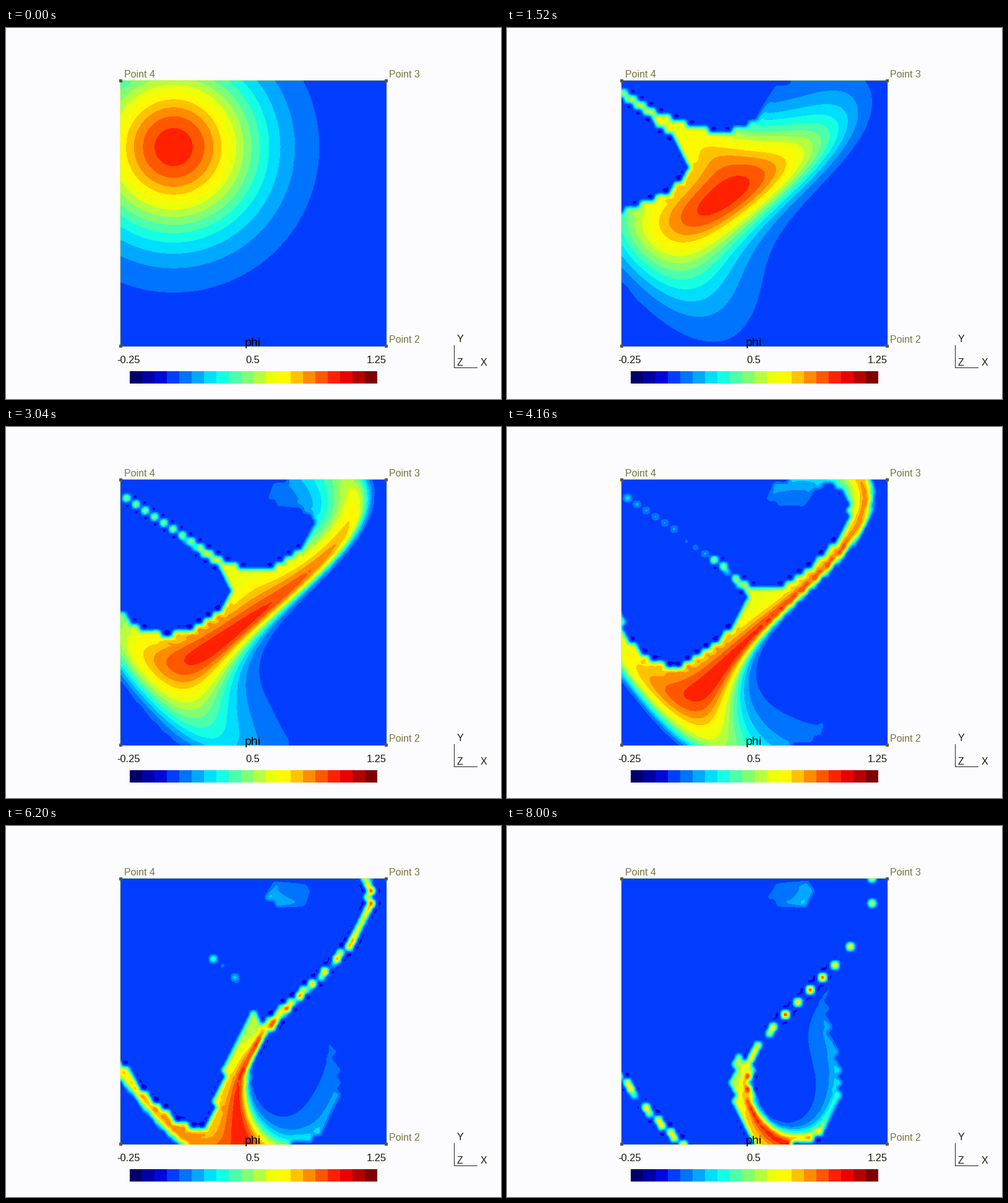
Write a matplotlib script that moves like this. It is 800 px wide and 600 px high and loops after 8040 ms.

```python
import numpy as np
import matplotlib.pyplot as plt
from matplotlib.animation import FuncAnimation
from matplotlib.patches import Rectangle

FRAMES, INTERVAL = 201, 40
SIDE, LEFT, TOP = 430, 185, 85
CELLS = 43
H = 1 / CELLS
SPEED = 0.00106
LOW, HIGH, LEVELS = -0.25, 1.25, 20
PAPER = (252, 252, 254)

# Rest lines of the flow: u vanishes on three rows, v on two columns.
Y1, Y2, Y3 = 0.244, 0.505, 0.945
X1 = 0.635


def palette():
    """Jet-like ramp, with the paper colour in front for values out of range."""
    t = 4 * np.linspace(0, 1, LEVELS)
    r = np.minimum(t - 1.39, 4.5 - t)
    g = np.minimum(t - 0.39, 3.5 - t)
    b = np.minimum(t + 0.43, 2.36 - t)
    ramp = 255 * np.clip(np.stack([r, g, b], axis=1), 0, 1)
    return np.vstack([PAPER, ramp]).astype(np.uint8)


COLORS = palette()


# Steady shear flow: horizontal speed depends on y, vertical speed on x.
def flow_u(y):
    y = np.clip(y, 0, 1)
    gain = 46 + 225 * np.sin(np.pi * y / 1.4) ** 2.5
    return -SPEED * gain * (y - Y1) * (y - Y2) * (y - Y3)


def flow_v(x):
    x = np.clip(x, 0, 1)
    return SPEED * x * (x - X1) * (50 - 10 * x)


S = np.linspace(0, 1, 2001)
U_SUM, V_SUM = np.cumsum(flow_u(S)) * S[1], np.cumsum(flow_v(S)) * S[1]


def stream(x, y):
    return np.interp(y, S, U_SUM) - np.interp(x, S, V_SUM)


def step_back(x, y):
    """One Runge-Kutta step against the flow."""
    a, b = flow_u(y), flow_v(x)
    c, d = flow_u(y - b / 2), flow_v(x - a / 2)
    e, f = flow_u(y - d / 2), flow_v(x - c / 2)
    g, h = flow_u(y - f), flow_v(x - e)
    return x - (a + 2 * c + 2 * e + g) / 6, y - (b + 2 * d + 2 * f + h) / 6


def near(x, y, x0, y0):
    """Nodes close to the streamline through a saddle point."""
    gap = stream(x, y) - stream(x0, y0)
    return np.abs(gap) < 0.006 * np.hypot(flow_u(y), flow_v(x))


def solve():
    """Node values per frame, traced back to the starting bell."""
    j, i = np.mgrid[0:CELLS + 1, 0:CELLS + 2]
    x = np.clip((i - 0.5 * (j % 2)) * H, 0, 1)
    y = j * H
    # Thin filaments stay caught on the mesh and fade slowly.
    keep = np.zeros(x.shape)
    keep[near(x, y, 0, Y3) & (y < Y3) & (y > 0.6) & (x < 0.45)] = 0.955
    keep[near(x, y, X1, Y2) & ((x - X1) * (y - Y2) > 0)
         & (y > 0.15) & (x > 0.45)] = 0.982
    keep[near(x, y, 0, Y1) & (y < Y1) & (x < 0.3)] = 0.992

    alive = np.ones(x.shape, bool)
    phi, out = np.zeros(x.shape), []
    for _ in range(FRAMES):
        exact = alive * np.exp(-10 * ((x - 0.2) ** 2 + (y - 0.75) ** 2))
        phi = np.maximum(exact, keep * phi)
        out.append(phi)
        x, y = step_back(x, y)
        alive = alive & (x >= 0) & (x <= 1) & (y >= 0) & (y <= 1)
    return out


def weights(pos, n):
    """Cubic interpolation matrix from n nodes to the given positions."""
    i = np.clip(np.floor(pos).astype(int), 0, n - 2)
    t = pos - i
    parts = [-t * (1 - t) ** 2 / 2, 1 - 2.5 * t ** 2 + 1.5 * t ** 3,
             t / 2 + 2 * t ** 2 - 1.5 * t ** 3, -t * t * (1 - t) / 2]
    m = np.zeros((len(pos), n))
    for k, w in enumerate(parts):
        np.add.at(m, (np.arange(len(pos)), np.clip(i - 1 + k, 0, n - 1)), w)
    return m


PIX = (np.arange(SIDE) + 0.5) / SIDE
EVEN = weights(PIX / H, CELLS + 2)
ODD = weights(PIX / H + 0.5, CELLS + 2)
ROWS = weights((1 - PIX) / H, CELLS + 1)
NODES = solve()


def picture(n):
    rows = np.empty((CELLS + 1, SIDE))
    rows[::2] = NODES[n][::2] @ EVEN.T
    rows[1::2] = NODES[n][1::2] @ ODD.T
    phi = ROWS @ rows
    phi = np.where(phi < 0, 0.5 * phi, phi)
    level = np.floor((phi - LOW) / (HIGH - LOW) * LEVELS).astype(int)
    return COLORS[np.clip(level, -1, LEVELS - 1) + 1]


def rgb(*c):
    return tuple(v / 255 for v in c)


fig = plt.figure(figsize=(8, 6), dpi=100, facecolor=rgb(*PAPER))
ax = fig.add_axes([0, 0, 1, 1])
ax.axis("off")

field = ax.imshow(picture(0), extent=(LEFT, LEFT + SIDE, TOP + SIDE, TOP),
                  interpolation="nearest", zorder=1)
ax.imshow(COLORS[None, 1:], extent=(200, 600, 575, 555), interpolation="nearest", zorder=1)
ax.set_xlim(0, 800)
ax.set_ylim(600, 0)
ax.set_aspect("auto")

INK, OLIVE = rgb(24, 24, 4), rgb(116, 116, 60)
EDGE, AXIS = rgb(236, 236, 140), rgb(30, 30, 30)


def box(x, y, w, h, color):
    ax.add_patch(Rectangle((x, y), w, h, fc=color, ec="none", lw=0, zorder=3, antialiased=False))


def label(x, y, s, size=16, color=INK, ha="center"):
    ax.text(x, y, s, fontsize=size * 0.72, family="Liberation Sans",
            color=color, ha=ha, va="baseline", zorder=5)


for shift in (-1, SIDE):
    box(LEFT, TOP + shift, SIDE, 1, EDGE)
    box(LEFT + shift, TOP, 1, SIDE, EDGE)
for px in (183, 612):
    for py in (83, 512):
        box(px, py, 5, 5, rgb(88, 88, 60))

for px, py, k in ((619, 509, 2), (619, 80, 3), (191, 80, 4)):
    label(px, py, f"Point {k}", color=OLIVE, ha="left")
label(399, 514, "phi", 19.5, "black")
for k, value in enumerate((LOW, (LOW + HIGH) / 2, HIGH)):
    label(198.5 + 200 * k, 542, f"{value:g}", 16.5)

box(724, 513, 1, 37, AXIS)
box(724, 549, 38, 1, AXIS)
label(734, 508, "Y")
label(733, 546, "Z")
label(771.5, 546, "X")


def update(n):
    field.set_data(picture(n))
    return (field,)


anim = FuncAnimation(fig, update, frames=FRAMES, interval=INTERVAL,
                     repeat=True, repeat_delay=0, blit=False)
plt.show()
```
